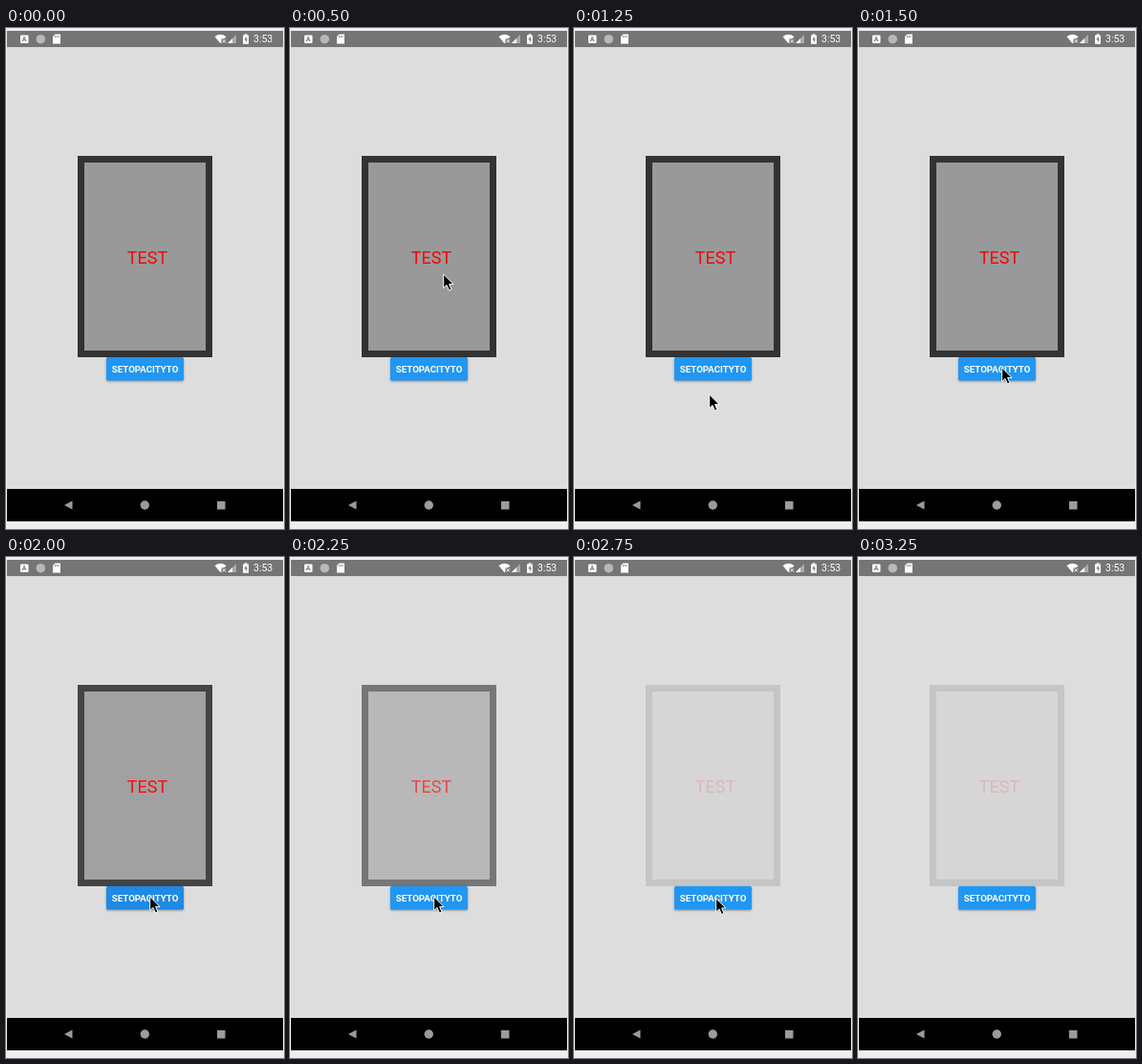
Recreate the animation shown at these times as an HTML page. Size 291x525 px, loop 3750 ms.

```html
<!DOCTYPE html>
<html lang="en">
<head>
<meta charset="utf-8">
<style>
  html, body { margin: 0; height: 100%; overflow: hidden; background: #eee; }
  svg { display: block; width: 291px; height: 525px; font-family: Roboto, sans-serif; }
</style>
</head>
<body>
<svg viewBox="0 0 291 525">
  <rect x="1" y="3" width="289" height="17" fill="#757575"/>
  <rect x="1" y="20" width="289" height="463" fill="#ddd"/>
  <rect x="1" y="483" width="289" height="34"/>

  <!-- status bar -->
  <g fill="#fff">
    <rect x="15" y="7.5" width="8.5" height="8.5" rx="1"/>
    <text x="19.2" y="14.3" font-size="7" font-weight="700" text-anchor="middle" fill="#757575">A</text>
    <circle cx="36.3" cy="11.7" r="4.8" fill="#b8b8b8"/>
    <path d="M51.5 6.5H57V16.5H49V9Z"/>
    <path d="M51.5 8v2M53.3 8v2M55.1 8v2" stroke="#757575" stroke-width=".8"/>
    <path d="M218.5 9Q224.5 4.5 230.5 9L228.5 11.3H225.5V15L224.5 16.2Z"/>
    <path d="M226.7 12.2l3.2 3.2m0-3.2l-3.2 3.2" stroke="#fff"/>
    <path d="M241 7V16H232Z" fill="#aaa"/>
    <path d="M237 11V16H232Z"/>
    <path d="M248 7.5h1.7v-1.2h2.6v1.2H254V16.7H248Z"/>
    <path d="M251.6 8.6l-2.2 3.7h1.4v3l2.2-3.8h-1.4Z" fill="#757575"/>
    <text x="259" y="15.3" font-size="10.5">3:53</text>
  </g>

  <!-- navigation bar -->
  <g fill="#9b9b9b">
    <path d="M61 500L69.5 495.5V504.5Z"/>
    <circle cx="145.3" cy="500" r="4.7"/>
    <rect x="221" y="496" width="8.5" height="8.5"/>
  </g>

  <path id="border" d="M75 134H216V345H75ZM82 141V338H209V141Z" fill="#333"/>
  <rect id="panel" x="82" y="141" width="127" height="197" fill="#999"/>
  <text id="label" x="148" y="246.7" font-size="18" text-anchor="middle" fill="red">TEST</text>

  <rect id="button" x="105" y="345" width="81" height="24.5" rx="1.5"
    style="filter: drop-shadow(0 1px 1px rgba(0,0,0,.35))"/>
  <text x="145.6" y="361" font-size="9.7" font-weight="600" text-anchor="middle" fill="#fff">SETOPACITYTO</text>

  <path id="cursor" d="M.7 1V15.5L4 12.4L6.5 18L9 17L6.6 11.4H11Z" stroke="#fff" stroke-width="1"/>
</svg>
<script>
const LOOP = 3750;
const byId = id => document.getElementById(id);
const [border, panel, label, button, cursor] =
  ['border', 'panel', 'label', 'button', 'cursor'].map(byId);

// [start time, value]; each value holds until the next start
const positions = [
  [0, null], [500, [160, 257]], [750, [143, 337]], [1000, [134, 416]],
  [1250, [141, 383]], [1500, [150, 355]], [2500, [148, 356.5]], [3250, null]
];
const opacities = [[0, 1], [2000, .9], [2250, .6], [2500, .265], [2750, .14]];
const held = (steps, t) => steps.filter(([start]) => start <= t).pop()[1];

function draw(now) {
  const t = now % LOOP;
  const alpha = held(opacities, t);
  border.style.opacity = label.style.opacity = alpha;
  panel.style.opacity = alpha ** 1.2;
  button.style.fill = t >= 1750 && t < 2250 ? '#1f89e5' : '#2196f3';
  const position = held(positions, t);
  cursor.style.display = position ? '' : 'none';
  if (position) cursor.setAttribute('transform', `translate(${position})`);
}

const origin = performance.now();
function tick() {
  draw(performance.now() - origin);
  requestAnimationFrame(tick);
}
tick();
</script>
</body>
</html>
```
